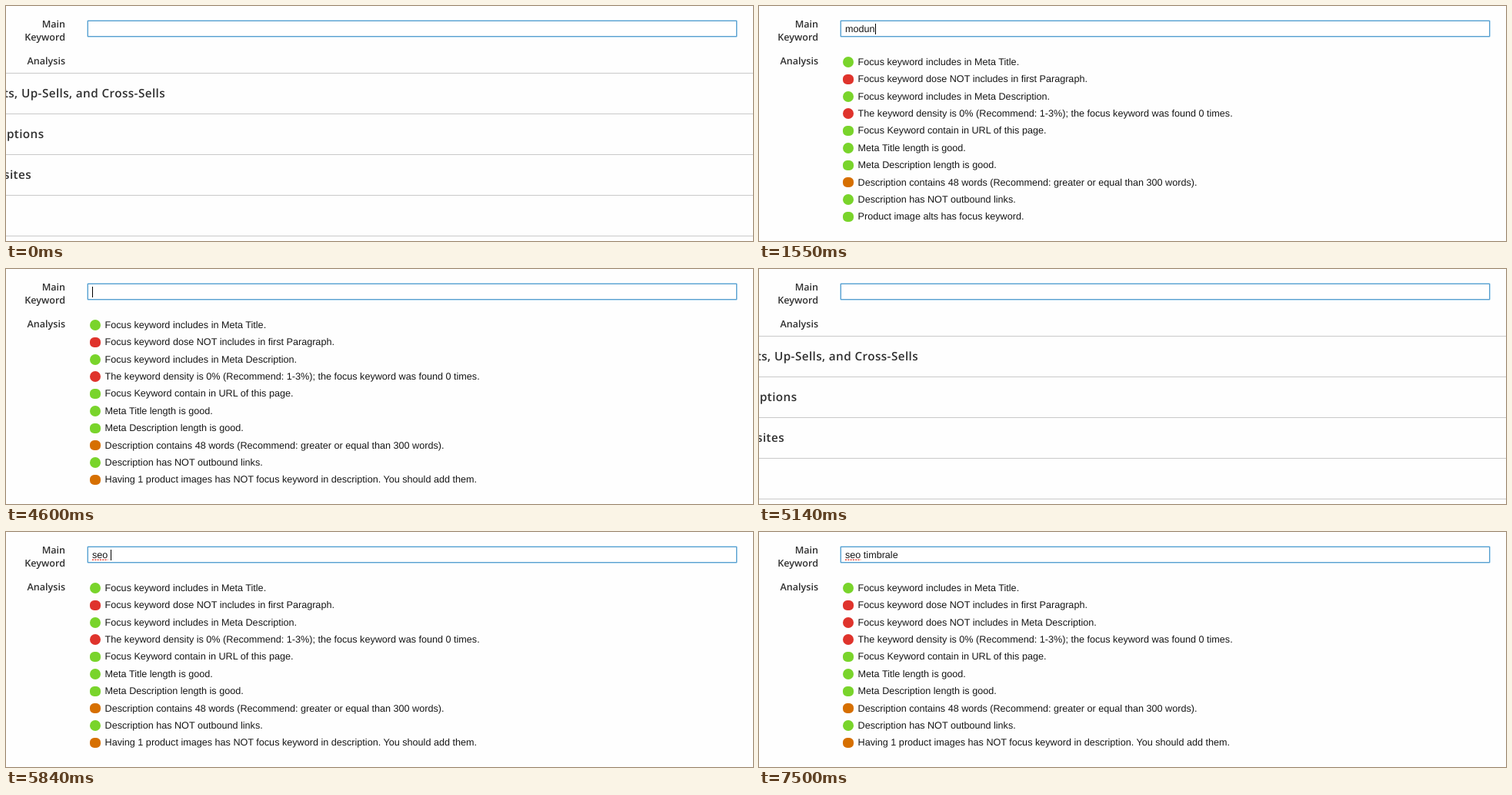
Animation of 971x306 px, one loop 8000 ms. Source, as an HTML page:

```html
<!DOCTYPE html>
<html lang="en">
<head>
<meta charset="utf-8">
<title>Keyword analysis</title>
<style>
  html, body { margin: 0; width: 100%; height: 100%; overflow: hidden; background: #fefefe; }
  svg { display: block; }
  text { font: 12.62px "Liberation Sans", Arial, sans-serif; fill: #161616; white-space: pre; text-rendering: geometricPrecision; }
  .label, .title { font: 600 12.6px "Open Sans", sans-serif; fill: #303030; text-anchor: end; }
  .title { font-size: 15.3px; letter-spacing: .025em; }
</style>
</head>
<body>
<svg id="stage" width="971" height="306" viewBox="0 0 971 306">
  <text class="label" x="77.1" y="28">Main</text>
  <text class="label" x="77.1" y="45">Keyword</text>
  <text class="label" x="77.1" y="76">Analysis</text>
  <rect x="105.5" y="18.5" width="845" height="22" rx="1.5" fill="none" stroke="#b4d9f0"/>
  <rect x="106.5" y="19.5" width="843" height="20" fill="#fff" stroke="#5a9fce"/>
  <rect id="selection" x="112" y="23" height="14" fill="#b4d5fe"/>
  <text id="typed" x="112" y="34" xml:space="preserve"></text>
  <path id="squiggle" fill="none" stroke="#e8483c" stroke-width="1.6" stroke-dasharray="2 1.3"/>
  <rect id="caret" y="23" width="1" height="14" fill="#000"/>
  <g id="sections"></g>
  <g id="analysis"></g>
</svg>
<script>
const LOOP = 8000, TEXT_X = 112;
const COLORS = { g: '#79d42b', r: '#df332c', o: '#d66f00' };
const $ = id => document.getElementById(id);

// Each row lists its possible results: [colour key, message].
const CHECKS = [
  [['g', 'Focus keyword includes in Meta Title.']],
  [['g', 'Focus keyword includes in first Paragraph.'],
   ['r', 'Focus keyword dose NOT includes in first Paragraph.']],
  [['g', 'Focus keyword includes in Meta Description.'],
   ['r', 'Focus keyword does NOT includes in Meta Description.']],
  [['g', 'The keyword density is 25.3%, which is great; the focus keyword was found 20 times.'],
   ['r', 'The keyword density is 0% (Recommend: 1-3%); the focus keyword was found 0 times.']],
  [['g', 'Focus Keyword contain in URL of this page.']],
  [['g', 'Meta Title length is good.']],
  [['g', 'Meta Description length is good.']],
  [['o', 'Description contains 48 words (Recommend: greater or equal than 300 words).']],
  [['g', 'Description has NOT outbound links.']],
  [['g', 'Product image alts has focus keyword.'],
   ['o', 'Having 1 product images has NOT focus keyword in description. You should add them.']]
];

const FIRST = 'modunlesa ', SECOND = 'seo timbrale ';

// [start, word, typed letters, mode, results of the variable rows]
// mode: | caret on, - caret off, # all selected
const STEPS = [
  [0, FIRST, 0, '-', ''], [350, FIRST, 0, '|', ''], [830, FIRST, 0, '-', ''],
  [1070, FIRST, 1, '|', ''], [1250, FIRST, 2, '|', '1010'], [1350, FIRST, 3, '|', '1010'],
  [1450, FIRST, 4, '|', '1010'], [1550, FIRST, 5, '|', '1010'],
  [1730, FIRST, 6, '|', '1010'], [1840, FIRST, 7, '|', '1011'],
  [2020, FIRST, 8, '|', '1011'], [2260, FIRST, 9, '|', '1011'], [2740, FIRST, 9, '-', '1011'],
  [3220, FIRST, 10, '|', '1011'], [3700, FIRST, 10, '-', '1011'], [4060, FIRST, 10, '#', '1011'],
  [4600, FIRST, 0, '|', '1011'], [4780, FIRST, 0, '|', ''], [5140, FIRST, 0, '-', ''],
  [5220, SECOND, 1, '|', ''], [5310, SECOND, 1, '|', '0001'],
  [5490, SECOND, 2, '|', '0001'], [5610, SECOND, 3, '|', '0001'], [5730, SECOND, 3, '|', '1011'],
  [5840, SECOND, 4, '|', '1011'], [5960, SECOND, 5, '|', '1011'],
  [6130, SECOND, 6, '|', '1011'], [6230, SECOND, 7, '|', '1011'],
  [6330, SECOND, 7, '|', '1111'], [6430, SECOND, 8, '|', '1111'],
  [6600, SECOND, 9, '|', '1111'], [6705, SECOND, 10, '|', '1111'], [6810, SECOND, 11, '|', '1111'],
  [6915, SECOND, 12, '|', '1111'], [7020, SECOND, 13, '|', '1111'], [7500, SECOND, 13, '-', '1111']
];

function add(parent, tag, attrs, text = '') {
  const el = document.createElementNS('http://www.w3.org/2000/svg', tag);
  for (const key in attrs) el.setAttribute(key, attrs[key]);
  el.textContent = text;
  return parent.appendChild(el);
}

for (let i = 0; i < 5; i++)
  add($('sections'), 'rect', { x: 0, y: 87 + 53 * i, width: 971, height: 1, fill: '#c9c9c9' });
[['ts, Up-Sells, and Cross-Sells', 207], ['ptions', 49.5], ['sites', 33]].forEach(([title, x], i) =>
  add($('sections'), 'text', { class: 'title', x, y: 119 + 53 * i }, title));

// Dots snap to whole pixels: some are full circles, some lose a row and look squarer.
const rows = CHECKS.map((_, i) => {
  const dy = 22.38 * i, top = Math.round(66.3 + dy), height = Math.floor(66.3 + dy) + 14 - top;
  return {
    dot: add($('analysis'), 'rect', { x: 109, y: top, width: 14, height, rx: height < 14 ? 5.6 : 7 }),
    text: add($('analysis'), 'text', { x: 128.6, y: Math.floor(77.4 + dy) })
  };
});

const show = (el, on) => el.setAttribute('visibility', on ? 'visible' : 'hidden');

function widthOf(text) {
  $('typed').textContent = text;
  return text ? $('typed').getComputedTextLength() : 0;
}

function render([, word, count, mode, results]) {
  const text = word.slice(0, count), space = text.indexOf(' ');
  const wordWidth = space > 0 ? widthOf(text.slice(0, space)) : 0;
  const width = widthOf(text);

  $('caret').setAttribute('x', Math.round(TEXT_X + width));
  show($('caret'), mode === '|');
  $('selection').setAttribute('width', width);
  show($('selection'), mode === '#');
  $('squiggle').setAttribute('d', `M${TEXT_X} 36.2h${wordWidth}`);
  show($('squiggle'), space > 0);

  show($('sections'), !results);
  show($('analysis'), results);
  if (!results) return;
  let n = 0;
  CHECKS.forEach((options, i) => {
    const [color, message] = options[options.length > 1 ? +results[n++] : 0];
    rows[i].dot.setAttribute('fill', COLORS[color]);
    rows[i].text.textContent = message;
  });
}

let current;
function tick() {
  const t = performance.now() % LOOP;
  const step = STEPS.findLast(s => s[0] <= t);
  if (step !== current) render(current = step);
  requestAnimationFrame(tick);
}
tick();
</script>
</body>
</html>
```
